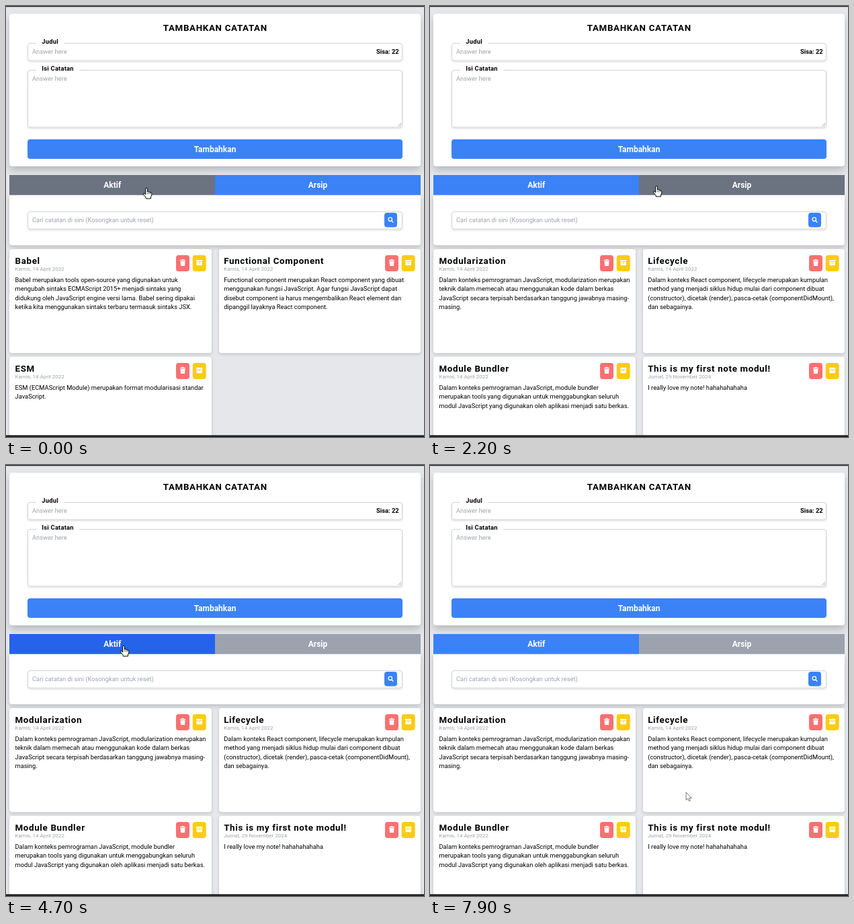
An HTML page with a canvas that plays this animation: 622 px wide and 640 px high, repeating every 8000 ms.

```html
<!DOCTYPE html>
<html lang="id">
<head>
<meta charset="utf-8">
<title>Catatan</title>
<style>
html, body { margin: 0; width: 100%; height: 100%; overflow: hidden; background: #e5e7eb; }
canvas { display: block; width: 622px; height: 640px; }
</style>
</head>
<body>
<canvas id="stage"></canvas>
<script>
const W = 622, H = 640, LOOP = 8000, STEP = 100;
const canvas = document.getElementById('stage');
const ratio = window.devicePixelRatio || 1;
canvas.width = W * ratio;
canvas.height = H * ratio;
const ctx = canvas.getContext('2d');

const PAGE = '#e5e7eb', PAPER = '#fff', INK = '#000', MUTED = '#9ca3af';
const BLUE = '#3b82f6', DEEP = '#2563eb', IDLE = '#9ca3af', DARK = '#6b7280';
const RED = '#f87171', YELLOW = '#facc15', EDGE = '#222';
const DATE = 'Kamis, 14 April 2022';

const archived = [
  ['Babel', DATE, [
    'Babel merupakan tools open-source yang digunakan untuk',
    'mengubah sintaks ECMAScript 2015+ menjadi sintaks yang',
    'didukung oleh JavaScript engine versi lama. Babel sering dipakai',
    'ketika kita menggunakan sintaks terbaru termasuk sintaks JSX.']],
  ['Functional Component', DATE, [
    'Functional component merupakan React component yang dibuat',
    'menggunakan fungsi JavaScript. Agar fungsi JavaScript dapat',
    'disebut component ia harus mengembalikan React element dan',
    'dipanggil layaknya React component.']],
  ['ESM', DATE, [
    'ESM (ECMAScript Module) merupakan format modularisasi standar',
    'JavaScript.']]
];
const active = [
  ['Modularization', DATE, [
    'Dalam konteks pemrograman JavaScript, modularization merupakan',
    'teknik dalam memecah atau menggunakan kode dalam berkas',
    'JavaScript secara terpisah berdasarkan tanggung jawabnya masing-',
    'masing.']],
  ['Lifecycle', DATE, [
    'Dalam konteks React component, lifecycle merupakan kumpulan',
    'method yang menjadi siklus hidup mulai dari component dibuat',
    '(constructor), dicetak (render), pasca-cetak (componentDidMount),',
    'dan sebagainya.']],
  ['Module Bundler', DATE, [
    'Dalam konteks pemrograman JavaScript, module bundler',
    'merupakan tools yang digunakan untuk menggabungkan seluruh',
    'modul JavaScript yang digunakan oleh aplikasi menjadi satu berkas.']],
  ['This is my first note modul!', 'Jumat, 29 November 2024', [
    'I really love my note! hahahahahaha']]
];

// Pointer hotspot: time, x, y
const path = [
  [0, 209, 270], [1850, 209, 270], [2200, 337, 267], [3000, 337, 267],
  [3400, 326, 268], [3850, 326, 268], [4350, 175, 268], [5000, 175, 268],
  [5600, 296, 311], [6400, 381, 486], [8000, 381, 486]
];

function pointer(t) {
  let i = 1;
  while (i < path.length - 1 && t > path[i][0]) i++;
  const [t0, x0, y0] = path[i - 1], [t1, x1, y1] = path[i];
  let k = (t - t0) / (t1 - t0);
  k = k * k * (3 - 2 * k);
  return [x0 + (x1 - x0) * k, y0 + (y1 - y0) * k];
}

// 0 = Aktif, 1 = Arsip
const tabAt = t => t < 1400 || (t >= 3500 && t < 4600) ? 1 : 0;
const overTabs = (x, y) => y >= 251 && y < 281 && x > 5 && x < 617;

function tabColor(i, t) {
  const [x, y] = pointer(t);
  const hover = overTabs(x, y) && (x < 311 ? 0 : 1) === i;
  if (tabAt(t) === i) return hover ? DEEP : BLUE;
  return hover ? DARK : IDLE;
}

function box(x, y, w, h, r, fill, shadow) {
  ctx.save();
  if (shadow) {
    const [alpha, drop, blur] = shadow;
    ctx.shadowColor = `rgba(0,0,0,${alpha})`;
    ctx.shadowOffsetY = drop * ratio;
    ctx.shadowBlur = blur * ratio;
  }
  ctx.fillStyle = fill;
  ctx.beginPath();
  ctx.roundRect(x, y, w, h, r);
  ctx.fill();
  ctx.restore();
}

function text(s, x, y, size, weight, color, align = 'left', spacing = 0) {
  ctx.font = `${weight} ${size}px Roboto, sans-serif`;
  ctx.letterSpacing = spacing + 'px';
  ctx.textAlign = align;
  ctx.fillStyle = color;
  ctx.fillText(s, x, y);
}

function field(x, y, w, h) {
  box(x, y, w, h, 4, PAPER, [.14, 1.5, 3]);
  ctx.strokeStyle = '#d1d5db';
  ctx.lineWidth = 1;
  ctx.beginPath();
  ctx.roundRect(x + .5, y + .5, w - 1, h - 1, 3.5);
  ctx.stroke();
}

function label(s, y, w) {
  box(45, y - 9, w, 12, 0, PAPER);
  text(s, 53.3, y, 9.33, 700, INK, 'left', .23);
}

function trash(x, y) {
  ctx.fillStyle = PAPER;
  ctx.fillRect(x - 4, y - 4, 8, 1.3);
  ctx.fillRect(x - 1.5, y - 5, 3, 1.2);
  ctx.beginPath();
  ctx.moveTo(x - 3.5, y - 2);
  ctx.lineTo(x + 3.5, y - 2);
  ctx.lineTo(x + 3, y + 5);
  ctx.lineTo(x - 3, y + 5);
  ctx.fill();
}

function archive(x, y) {
  ctx.fillStyle = PAPER;
  ctx.fillRect(x - 4.7, y - 4, 9.4, 2.2);
  ctx.fillRect(x - 4.2, y - 1.2, 8.4, 5.4);
  ctx.fillStyle = YELLOW;
  ctx.fillRect(x - 1.5, y - .2, 3, 1);
}

function note([title, date, lines], i) {
  const right = i % 2, x = right ? 317 : 5, w = right ? 300 : 301;
  const y = 361 + 160 * (i >> 1), tx = right ? 324.2 : 13.5;
  box(x, y, w, 154.5, 4, PAPER, [.18, 1.5, 4]);
  text(title, tx, y + 21.5, 13.33, 700, INK, 'left', .67);
  text(date, tx, y + 31.5, 8, 400, MUTED);
  lines.forEach((s, n) => text(s, tx, y + 49 + n * 13.33, 9.33, 400, INK));
  const bx = right ? 564 : 253;
  box(bx, y + 9, 20, 24, 4, RED);
  box(bx + 24.7, y + 9, 20, 24, 4, YELLOW);
  trash(bx + 10, y + 20);
  archive(bx + 34.7, y + 20);
}

function tab(i, t) {
  ctx.fillStyle = tabColor(i, t);
  ctx.fillRect(i ? 311 : 5, 251, 306, 29.7);
  text(i ? 'Arsip' : 'Aktif', i ? 464 : 158.3, 270, 12, 700, PAPER, 'center');
}

function form() {
  box(5, 11.5, 612, 226.5, 4, PAPER, [.2, 6, 12]);
  text('TAMBAHKAN CATATAN', 311.3, 36.6, 13.33, 700, INK, 'center', .67);
  field(32, 55, 558, 26.5);
  label('Judul', 56, 41);
  text('Answer here', 39, 71, 9.33, 400, MUTED);
  text('Sisa: 22', 584.7, 71, 9.33, 700, INK, 'right');
  field(32, 95, 558, 85.5);
  label('Isi Catatan', 96, 64);
  text('Answer here', 39, 110.7, 9.33, 400, MUTED);
  ctx.strokeStyle = '#888';
  ctx.lineWidth = .7;
  ctx.beginPath();
  for (const d of [5, 2.5]) {
    ctx.moveTo(588.5 - d, 178.5);
    ctx.lineTo(588.5, 178.5 - d);
  }
  ctx.stroke();
  box(32, 198, 558, 29, 4, BLUE);
  text('Tambahkan', 311, 217, 12, 700, PAPER, 'center');
}

function search() {
  box(5, 280.7, 612, 74.5, [0, 0, 4, 4], PAPER, [.18, 3, 6]);
  field(32, 305, 558, 26.5);
  text('Cari catatan di sini (Kosongkan untuk reset)', 39, 321, 9.33, 400, MUTED);
  box(563, 307, 19, 21.5, 4, BLUE);
  ctx.strokeStyle = PAPER;
  ctx.lineWidth = 1.3;
  ctx.beginPath();
  ctx.arc(571.8, 316.8, 2.7, 0, 7);
  ctx.moveTo(573.8, 318.8);
  ctx.lineTo(576.5, 321.5);
  ctx.stroke();
}

const hand = new Path2D('M-1.3 1Q0-.8 1.3 1V6Q2.6 4.8 3.8 6.4Q5 5.6 5.9 7Q7.6 6.6 7.8 8.4V11L6.4 14V16H-.8V14.4L-4.6 9.8Q-5 7.8-3.2 8.2L-1.3 10Z');
const arrow = new Path2D('M0 0V11.6L2.7 9.2L4.4 13L6.3 12.2L4.6 8.5H8.2Z');

function cursor(t) {
  const [x, y] = pointer(t);
  const inField = x >= 32 && x < 590 && y >= 305 && y < 331;
  ctx.save();
  ctx.translate(x, y);
  ctx.lineJoin = 'round';
  ctx.lineWidth = 1;
  if (overTabs(x, y)) {
    ctx.fillStyle = PAPER;
    ctx.strokeStyle = INK;
    ctx.fill(hand);
    ctx.stroke(hand);
    ctx.beginPath();
    for (const k of [1.3, 3.6, 5.7]) {
      ctx.moveTo(k, 7);
      ctx.lineTo(k, 9.5);
    }
    ctx.lineWidth = .6;
    ctx.stroke();
  } else if (inField) {
    ctx.fillStyle = '#444';
    ctx.fillRect(-.5, -5, 1, 10);
    ctx.fillRect(-2, -5.5, 4, 1);
    ctx.fillRect(-2, 4, 4, 1);
  } else {
    ctx.fillStyle = PAPER;
    ctx.strokeStyle = '#777';
    ctx.fill(arrow);
    ctx.stroke(arrow);
  }
  ctx.restore();
}

function draw(t) {
  ctx.setTransform(ratio, 0, 0, ratio, 0, 0);
  ctx.fillStyle = PAGE;
  ctx.fillRect(0, 0, W, H);
  form();
  search();
  tab(0, t);
  tab(1, t);
  (tabAt(t) ? archived : active).forEach(note);
  ctx.fillStyle = EDGE;
  ctx.fillRect(0, 0, W, 1.3);
  ctx.fillRect(0, 637.3, W, 2.7);
  cursor(t);
}

let start;
function tick(now) {
  if (start === undefined) start = now;
  const t = (now - start) % LOOP;
  draw(Math.floor(t / STEP) * STEP);
  requestAnimationFrame(tick);
}
draw(0);
requestAnimationFrame(tick);
</script>
</body>
</html>
```
